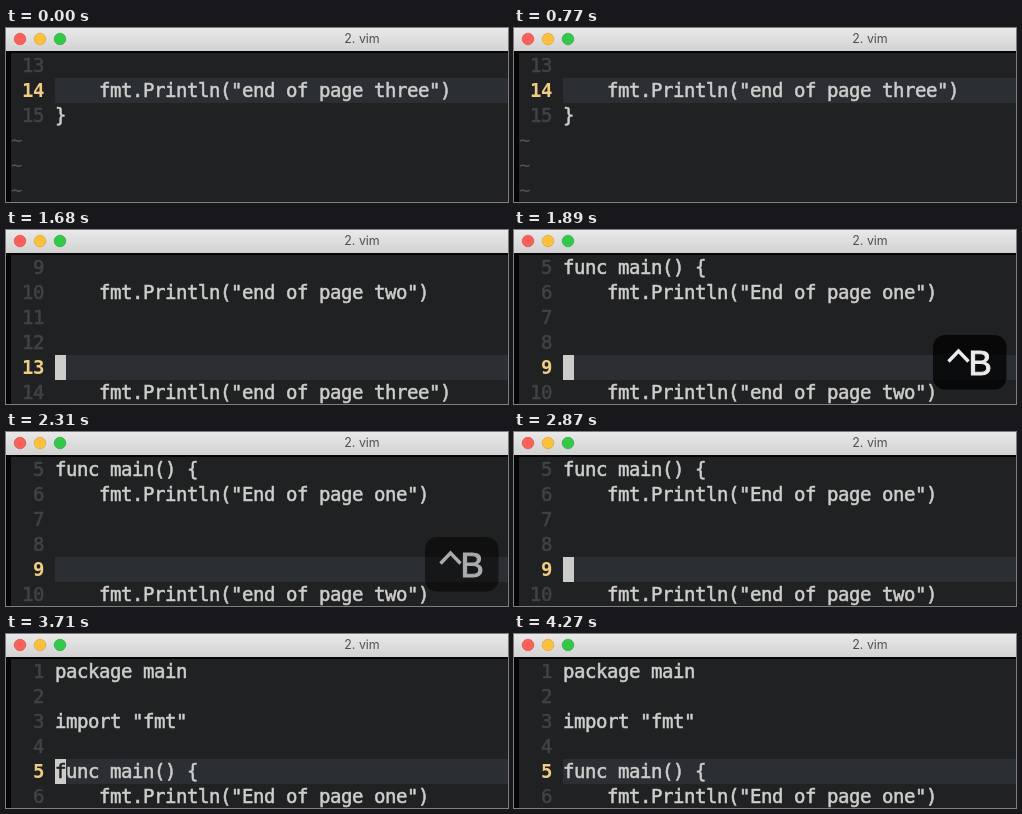
Recreate the animation shown at these times as an HTML page. Size 502 by 174 pixels, loop 4480 ms.

```html
<!DOCTYPE html>
<html lang="en">
<head>
<meta charset="utf-8">
<title>vim paging</title>
<style>
  html, body { margin: 0; width: 100%; height: 100%; overflow: hidden; background: #000; }
  svg { display: block; width: 502px; height: 174px; }
  .code {
    font: 19px "DejaVu Sans Mono", "Liberation Mono", monospace; letter-spacing: -.44px;
    fill: #cdcecc; stroke: #cdcecc; stroke-width: .55px;
  }
  .num { fill: #404346; stroke: #404346; }
  .now { fill: #f0cd83; stroke: none; font-weight: bold; }
  .tilde { fill: #515355; stroke: none; }
  .under { fill: #202122; stroke: #202122; }
  .title { font: 12.4px Inter, "Open Sans", sans-serif; fill: #505050; }
  .key { font: 35px "Liberation Sans", Inter, sans-serif; fill: #ececec; stroke: #ececec; stroke-width: 1px; }
</style>
</head>
<body>
<svg viewBox="0 0 502 174" xmlns="http://www.w3.org/2000/svg">
  <defs>
    <linearGradient id="bar" x2="0" y2="1">
      <stop offset="0" stop-color="#e9e9e9"/>
      <stop offset="1" stop-color="#d2d2d2"/>
    </linearGradient>
  </defs>
  <rect width="502" height="174" fill="#050505"/>
  <rect x="5" y="25" width="497" height="149" fill="#202122"/>
  <rect width="502" height="23" fill="url(#bar)"/>
  <g stroke-width=".7">
    <circle cx="14" cy="11" r="5.8" fill="#f9605a" stroke="#df4f49"/>
    <circle cx="34" cy="11" r="5.8" fill="#fbc03c" stroke="#dea336"/>
    <circle cx="54" cy="11" r="5.8" fill="#34c84a" stroke="#2bab3b"/>
  </g>
  <text class="title" x="356" y="15.4" text-anchor="middle">2. vim</text>
  <g id="pages"></g>
  <g id="cursor">
    <rect x="49" y="125" width="11" height="25" fill="#cccdcb"/>
    <text id="under" class="code under" x="49" y="144.3"></text>
  </g>
  <g id="overlay">
    <rect x="419" y="105" width="73.5" height="54.5" rx="12" fill="#000" fill-opacity=".75"/>
    <path d="M434.5 131.5 L444.5 121 L454.5 131.5" fill="none" stroke="#ececec" stroke-width="3.4"/>
    <text class="key" x="454.5" y="145">B</text>
  </g>
</svg>
<script>
const LOOP = 4480, STEP = 70, CELL = 11, ROW = 25, LEFT = 49;

const source = [
  'package main', '', 'import "fmt"', '', 'func main() {',
  '    fmt.Println("End of page one")', '', '', '',
  '    fmt.Println("end of page two")', '', '', '',
  '    fmt.Println("end of page three")', '}'
];

// first visible line, current line, start time
const views = [
  { top: 13, line: 14, at: 0 },
  { top: 9, line: 13, at: 840 },
  { top: 5, line: 9, at: 1820 },
  { top: 1, line: 5, at: 2940 }
];
const cursorOn = [[1540, 2030], [2520, 3010], [3570, 4060]];
const HOLD = 420, FADE = 210;

const $ = id => document.getElementById(id);

function add(parent, tag, attrs, text = '') {
  const el = document.createElementNS('http://www.w3.org/2000/svg', tag);
  for (const key in attrs) el.setAttribute(key, attrs[key]);
  el.textContent = text;
  return parent.appendChild(el);
}

function buildView({ top, line }) {
  const g = add($('pages'), 'g', {});
  add(g, 'rect', { x: LEFT, y: 25 + (line - top) * ROW, width: 453, height: ROW, fill: '#2b2e33' });
  for (let row = 0; row < 6; row++) {
    const n = top + row, y = 44.3 + row * ROW;
    if (n > source.length) {
      add(g, 'text', { class: 'code tilde', x: 5, y }, '~');
      continue;
    }
    const text = source[n - 1], body = text.trimStart();
    const digits = String(n);
    add(g, 'text', {
      class: 'code ' + (n === line ? 'now' : 'num'),
      x: 38 - digits.length * CELL, y
    }, digits);
    if (body) add(g, 'text', { class: 'code', x: LEFT + (text.length - body.length) * CELL, y }, body);
  }
  return g;
}

const groups = views.map(buildView);
const show = (el, on) => el.style.display = on ? '' : 'none';

function render(time) {
  const t = Math.floor((time % LOOP) / STEP) * STEP;
  const index = views.filter(v => v.at <= t).length - 1;
  const view = views[index];
  groups.forEach((g, i) => show(g, i === index));

  show($('cursor'), cursorOn.some(([a, b]) => t >= a && t < b));
  $('under').textContent = source[view.line - 1].charAt(0);

  const age = t - view.at;
  const alpha = index ? Math.min(1, Math.max(0, 1 - (age - HOLD) / FADE)) : 0;
  $('overlay').setAttribute('opacity', alpha);
}

const start = performance.now();
function tick() {
  render(performance.now() - start);
  requestAnimationFrame(tick);
}
tick();
</script>
</body>
</html>
```
